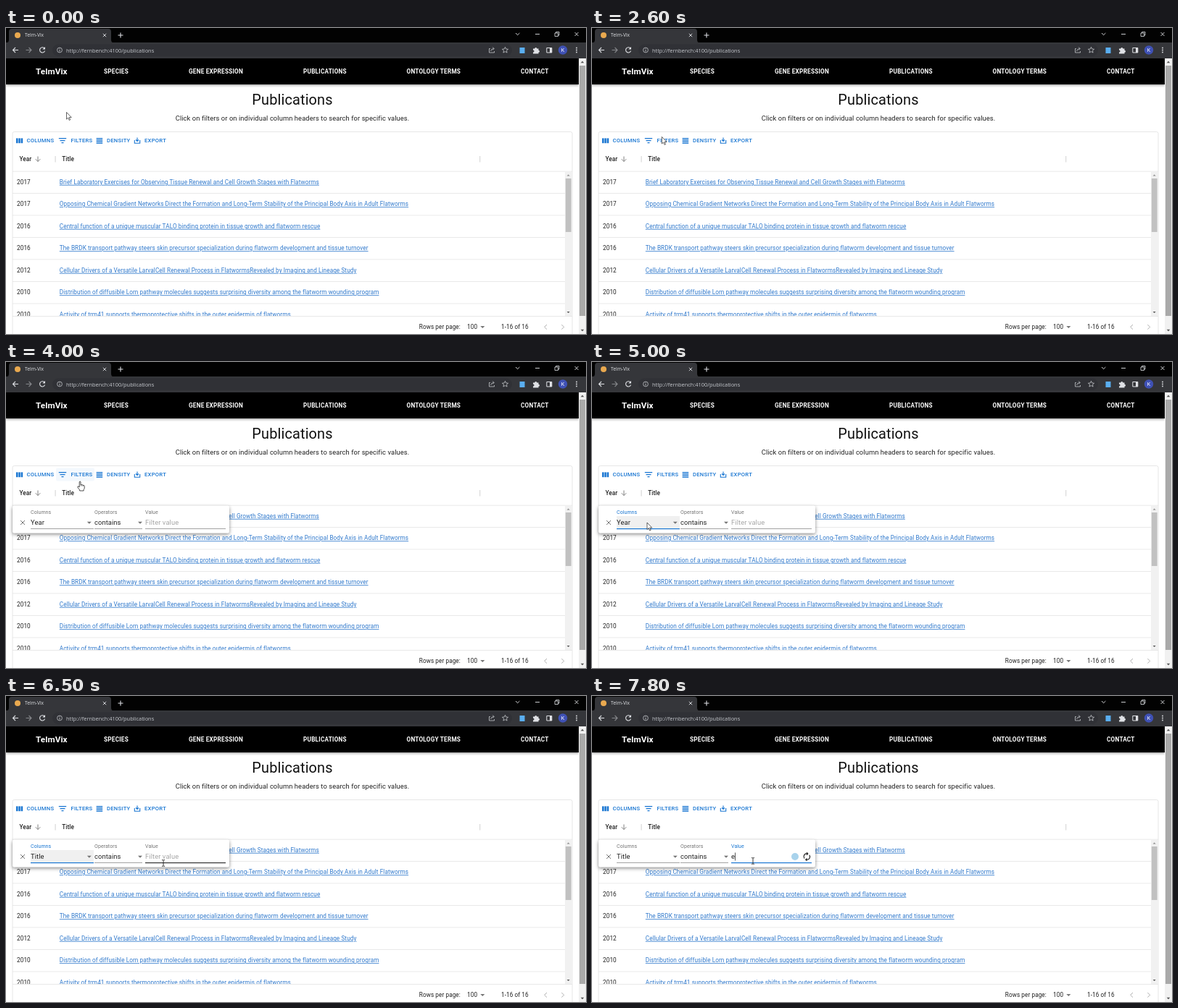
Write an HTML page that moves like this. It is 800 by 423 pixels and loops after 8000 ms.

```html
<!DOCTYPE html>
<html lang="en">
<head>
<meta charset="utf-8">
<title>Publications</title>
<style>
html, body { margin: 0; width: 100%; height: 100%; overflow: hidden; background: #fff; }
svg { display: block; width: 100vw; height: 100vh; }
text { font-family: Roboto, Arial, sans-serif; white-space: pre; }
.ui { font-family: "Open Sans", "Noto Sans", sans-serif; }
.link { text-decoration: underline; text-decoration-color: #1976d25c; text-decoration-thickness: .6px; text-underline-offset: 1.2px; }
</style>
</head>
<body>
<svg id="stage" viewBox="0 0 800 423"></svg>
<script>
const BLUE = '#1976d2', LINK = '#3079cc', INK = '#212121', GREY = '#757575', LINE = '#e0e0e0', PALE = '#dfe1e5';
const ZOOM = 800 / 1366; // page pixels to stage pixels

const text = (x, y, s, px, fill = INK, weight = 400, spacing = .0107, attrs = '') =>
  `<text x="${x}" y="${y}" font-size="${px * ZOOM}" fill="${fill}" font-weight="${weight}" letter-spacing="${spacing}em" ${attrs}>${s}</text>`;
const rect = (x, y, w, h, fill, attrs = '') =>
  `<rect x="${x}" y="${y}" width="${w}" height="${h}" fill="${fill}" ${attrs}/>`;
const path = (d, fill, attrs = '') => `<path d="${d}" fill="${fill}" ${attrs}/>`;
const stroke = (d, color, width = 1, attrs = '') =>
  path(d, 'none', `stroke="${color}" stroke-width="${width}" ${attrs}`);
const circle = (x, y, r, fill, attrs = '') => `<circle cx="${x}" cy="${y}" r="${r}" fill="${fill}" ${attrs}/>`;
const cross = (x, y, r, color, w = .9) =>
  stroke(`M${x - r} ${y - r}l${2 * r} ${2 * r}m0 ${-2 * r}l${-2 * r} ${2 * r}`, color, w);
const triangle = (x, y, w, h, fill) => path(`M${x - w} ${y - h / 2}h${2 * w}l${-w} ${h}z`, fill);

function browser() {
  return rect(0, 0, 800, 20.5, '#020202') +
    path('M0 20.5Q4 20.5 4 16V5Q4 1 8 1H141Q145 1 145 5V16Q145 20.5 149 20.5z', '#35363a') +
    rect(0, 20, 800, 22, '#35363a') +
    circle(16, 10, 4, '#e9a94f') +
    text(26, 12.4, 'Telm-Vix', 11.4, PALE, 400, 0, 'class="ui"') +
    cross(136, 10, 2.2, PALE) +
    stroke('M154.5 10h7M158 6.500v7', PALE, 1.1) +
    stroke('M703 7l2.700 2.700L708.400 7M730 8.500h6', PALE, .9) +
    stroke('M757 7h4.500v4.500H757zM758.500 7V5.500H763V10h-1.500', PALE, .8) +
    cross(787, 8.5, 2.5, PALE) +
    stroke('M17 30.500H9.500m3.500-3.500l-3.500 3.500L13 34', PALE, 1.1) +
    stroke('M27.500 30.500H35m-3.500-3.500L35 30.500L31.500 34', '#85878b', 1.1) +
    stroke('M52.900 28A3.600 3.600 0 1 0 53.600 31.600', PALE, 1.1) + path('M54 26v3.600h-3.600z', PALE) +
    rect(64, 22.5, 634, 16.5, '#303136', 'rx="8.25"') +
    circle(74, 30.5, 3.4, 'none', 'stroke="#c4c7cb" stroke-width=".8"') +
    stroke('M74 30v2.500M74 28.300v.9', '#c4c7cb', .9) +
    text(83, 33.5, 'http://fernbench:4100/publications', 12.7, '#c8cbd0', 400, 0, 'class="ui"') +
    stroke('M668 28.500h-1.500v5.500h7v-2M668.500 32q.5-3.500 4.500-3.500m-1.800-2l2 2l-2 2', '#c4c7cb', .8) +
    path('M688.500 26.300l1.200 2.700 2.900.3-2.200 1.900.7 2.900-2.600-1.500-2.600 1.500.7-2.900-2.200-1.900 2.900-.3z', 'none', 'stroke="#c4c7cb" stroke-width=".8"') +
    rect(708.5, 27, 7, 8, '#5aaef0') +
    path('M727 28.500h2.300a1.500 1.500 0 0 1 3 0h2.200v2.300a1.500 1.500 0 0 1 0 3v1.700H727v-2a1.500 1.500 0 0 0 0-3z', PALE) +
    stroke('M745.800 27.500h7v6.500h-7z', PALE, 1) + rect(750, 27.5, 3, 6.5, PALE) +
    circle(768, 30.5, 6.2, '#3f51b5') +
    text(768, 33, 'K', 12, '#fff', 400, 0, 'text-anchor="middle"') +
    [27.5, 30.5, 33.5].map(y => circle(787, y, .9, PALE)).join('');
}

function header() {
  const items = [[135, 'SPECIES'], [252, 'GENE EXPRESSION'], [410, 'PUBLICATIONS'], [552.5, 'ONTOLOGY TERMS'], [710, 'CONTACT']];
  return rect(0, 42, 790, 36, '#000', 'filter="url(#barShadow)"') +
    text(41, 63.8, 'TelmVix', 20, '#fff', 700, .0075) +
    items.map(([x, s]) => text(x, 62.8, s, 14, '#fff', 700, .0286)).join('') +
    text(395, 106, 'Publications', 34, '#111', 400, .00735, 'text-anchor="middle"') +
    text(395, 127.5, 'Click on filters or on individual column headers to search for specific values.', 16, INK, 400, .0094, 'text-anchor="middle"');
}

function toolbar() {
  const labels = [[28.5, 'COLUMNS'], [89.5, 'FILTERS'], [139, 'DENSITY'], [191, 'EXPORT']];
  return rect(69, 146.5, 53, 18, BLUE, 'id="hover" rx="2.3" opacity=".05"') +
    [14, 17.3, 20.6].map(x => rect(x, 152.4, 2.5, 6.8, BLUE)).join('') +
    stroke('M72.800 152.700h10.400M74.500 155.700h7M76.500 158.700h3', BLUE, 1.2) +
    [152, 154.2, 156.4, 158.6].map(y => rect(124.6, y, 8.6, 1.3, BLUE)).join('') +
    stroke('M177.300 155v4.200h7.400V155M181 151.500v5m-2-2l2 2l2-2', BLUE, 1.1) +
    labels.map(([x, s]) => text(x, 158.2, s, 13, BLUE, 500, .0354)).join('');
}

function table() {
  const rows = [
    [2017, 'Brief Laboratory Exercises for Observing Tissue Renewal and Cell Growth Stages with Flatworms'],
    [2017, 'Opposing Chemical Gradient Networks Direct the Formation and Long-Term Stability of the Principal Body Axis in Adult Flatworms'],
    [2016, 'Central function of a unique muscular TALO binding protein in tissue growth and flatworm rescue'],
    [2016, 'The BRDK transport pathway steers skin precursor specialization during flatworm development and tissue turnover'],
    [2012, 'Cellular Drivers of a Versatile LarvalCell Renewal Process in FlatwormsRevealed by Imaging and Lineage Study'],
    [2010, 'Distribution of diffusible Lorn pathway molecules suggests surprising diversity among the flatworm wounding program'],
    [2010, 'Activity of trm41 supports thermoprotective shifts in the outer epidermis of flatworms']
  ];
  const cells = rows.map(([year, title], i) => {
    const y = 215.8 + i * 30.5;
    return text(15, y, year, 14) + text(73.8, y, title, 14, LINK, 400, .0107, 'class="link"') +
      rect(9, y + 12.3, 762, .7, LINE);
  }).join('');
  return rect(9, 143.5, 772, 300, 'none', `rx="2.3" stroke="${LINE}" stroke-width=".8"`) + toolbar() +
    text(18.5, 184, 'Year', 14, INK, 500) + text(77.3, 184, 'Title', 14, INK, 500) +
    stroke('M44 177.500v7m-3.300-3.300l3.300 3.300l3.300-3.300', GREY, .9) +
    rect(67.6, 177, .9, 8.5, '#ccc') + rect(653.3, 177, .9, 8.5, '#ccc') +
    rect(9, 197.8, 772, .7, LINE) +
    `<g clip-path="url(#rows)">${cells}</g>` +
    rect(771, 198.5, 9.6, 200, '#f1f1f1') + rect(771.8, 208, 7.8, 74, '#c1c1c1') +
    triangle(775.6, 203.5, 2, -2.2, '#8a8a8a') + triangle(775.6, 393, 2, 2.2, '#505050') +
    rect(9, 398, 772, .7, LINE) +
    text(569.8, 416, 'Rows per page:', 14) + text(636, 416, '100', 14) + triangle(657.3, 413.5, 3, 3, GREY) +
    text(683, 416, '1-16 of 16', 14) +
    stroke('M746 410l-3.300 3.300l3.300 3.300M766.300 410l3.300 3.300l-3.300 3.300', '#b0b0b0', 1);
}

const pageScroll = () => rect(790, 42, 10, 381, '#f1f1f1') + rect(791, 52, 8, 346, '#a9a9a9') +
  triangle(795, 47, 2.3, -2.5, '#505050') + triangle(795, 418, 2.3, 2.5, '#505050');

function filterPanel() {
  const fields = [['Columns', 34, 87], ['Operators', 122, 66], ['Value', 192, 111]];
  return `<g id="panel">` + rect(9, 198.8, 299, 37.4, '#fff', 'rx="2.3" filter="url(#panelShadow)"') +
    cross(23, 222, 3, '#666') +
    rect(34, 213, 87, 17.5, '#000', 'id="selectTint" opacity=".06"') +
    fields.map(([name, x, w]) => text(x, 209.8, name, 12, GREY, 400, .0094, `id="label${name}"`) +
      rect(x, 230, w, .8, '#8d8d8d', `id="line${name}"`)).join('') +
    text(34, 225.2, 'Year', 16, INK, 400, .0094, 'id="column"') + triangle(114.8, 222.3, 3, 3, GREY) +
    text(122, 225.2, 'contains', 16, INK, 400, .0094) + triangle(185, 222.3, 3, 3, GREY) +
    text(192, 225.2, '', 16, INK, 400, .0094, 'id="value"') + rect(192, 216.5, .7, 11, '#111', 'id="caret"') +
    circle(280, 222, 5, '#a9d3ec', 'id="badge"') +
    `<g id="loader">` + stroke('M293 224.500A4 4 0 0 1 296.500 218M299.800 219.800A4 4 0 0 1 296 226.200', '#222', 1.2) +
    path('M296 215.600v4.800l2.600-2.400zM296.500 223.800v4.800l-2.600-2.400z', '#222') + `</g></g>`;
}

const pointers = () =>
  `<g id="arrow">${path('M0 0V9.600L2.200 7.600L3.700 11L5.200 10.300L3.700 7.100H6.700z', '#fff', 'stroke="#222" stroke-width=".7"')}</g>` +
  `<g id="hand">${path('M-.9 .6Q0-.6.9.6V4.600Q2 4 2.700 4.900Q3.900 4.400 4.400 5.400Q6 5.100 6.100 6.600V9Q6 10.500 5 11.600V13H-.5V11.800L-3.200 8.300Q-3.600 6.700-2.300 6.800L-.9 8z', '#fff', 'stroke="#222" stroke-width=".8"') +
    stroke('M.9 4.600v2M2.700 5v1.800M4.400 5.500V7', '#222', .5)}</g>` +
  `<g id="beam">${stroke('M-2-4.300h1.500L0-3.800L.5-4.300H2M0-3.800V3.800M-2 4.300h1.500L0 3.800L.5 4.300H2', '#222', .9)}</g>`;

const stage = document.getElementById('stage');
stage.innerHTML = `<defs>
  <clipPath id="rows"><rect x="9" y="198" width="762" height="200"/></clipPath>
  <filter id="barShadow" x="-5%" y="-20%" width="110%" height="160%"><feDropShadow dx="0" dy="1.500" stdDeviation="1.600" flood-opacity=".35"/></filter>
  <filter id="panelShadow" x="-10%" y="-40%" width="120%" height="200%"><feDropShadow dx="0" dy="2" stdDeviation="2.500" flood-opacity=".45"/></filter>
  </defs>` + rect(0, 0, 800, 423, '#fff') + header() + browser() + table() + pageScroll() + filterPanel() + pointers();

const el = id => document.getElementById(id);
const show = (id, on) => el(id).style.display = on ? '' : 'none';

// Pointer stops: time, x, y
const stops = [[0, 83.5, 116.5], [1700, 83.5, 116.5], [2500, 96, 150], [3100, 100.5, 155.5], [3900, 102, 165],
  [4250, 102.5, 165], [4750, 76, 222], [5000, 76, 222], [5400, 75, 247], [5750, 75, 247], [6300, 212, 234], [6700, 222, 228], [8000, 222, 228]];

function pointerAt(t) {
  const i = stops.findIndex(s => s[0] > t);
  const [t0, x0, y0] = stops[i - 1], [t1, x1, y1] = stops[i];
  const k = (t - t0) / (t1 - t0), e = k * k * (3 - 2 * k);
  return [x0 + (x1 - x0) * e, y0 + (y1 - y0) * e];
}

function focusField(name, on, hovered) {
  el('label' + name).setAttribute('fill', on ? BLUE : GREY);
  el('line' + name).setAttribute('fill', on ? BLUE : hovered ? '#333' : '#8d8d8d');
  el('line' + name).setAttribute('height', on || hovered ? 1.2 : .8);
}

function draw(now) {
  const t = now % 8000, [x, y] = pointerAt(t);
  const onSelect = t >= 4900 && t < 6800, onValue = t >= 6800, typed = t >= 7700;
  show('hover', t > 3150 && t < 4400);
  el('panel').style.opacity = Math.min(1, Math.max(0, (t - 3500) / 220));
  show('selectTint', onSelect);
  focusField('Columns', onSelect, false);
  focusField('Value', onValue, t > 6200);
  el('column').textContent = t < 5750 ? 'Year' : 'Title';
  el('value').textContent = typed ? 'e' : 'Filter value';
  el('value').setAttribute('fill', typed ? INK : '#a6a6a6');
  el('caret').setAttribute('x', typed ? 197.2 : 192);
  show('caret', onValue && (typed || (t - 6800) % 1000 < 500));
  show('badge', onValue);
  show('loader', typed);
  const shape = t < 2650 || (t >= 5000 && t < 6050) ? 'arrow' : t < 5000 ? 'hand' : 'beam';
  for (const id of ['arrow', 'hand', 'beam']) show(id, id === shape);
  el(shape).setAttribute('transform', `translate(${x} ${y})`);
}

const start = performance.now();
(function tick() {
  draw(performance.now() - start);
  requestAnimationFrame(tick);
})();
</script>
</body>
</html>
```
